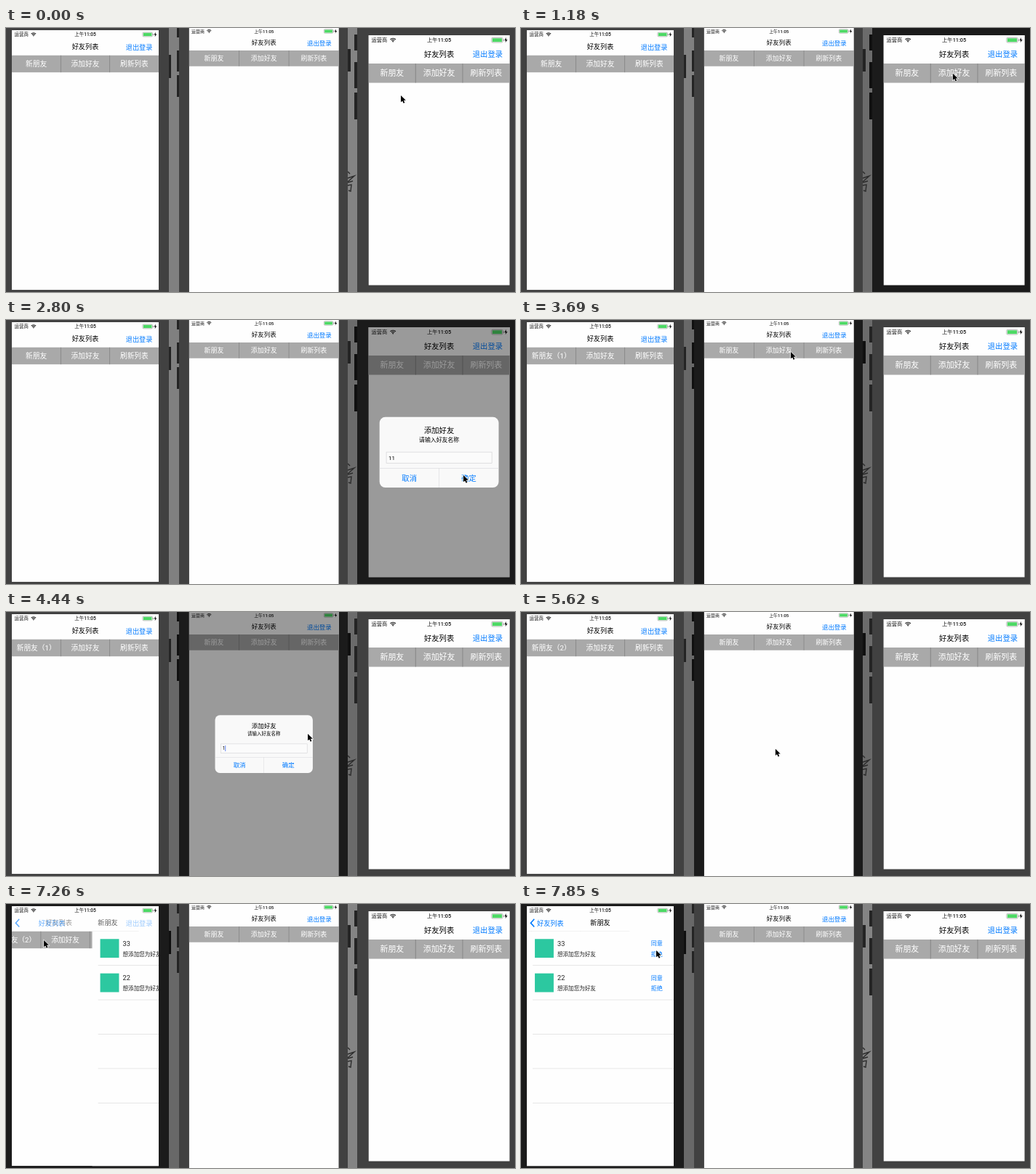
These frames come from a looping animation (700x364 px, 8000 ms). An HTML page with a canvas:

```html
<!DOCTYPE html>
<html lang="zh">
<head>
<meta charset="utf-8">
<style>
html, body { margin: 0; width: 100%; height: 100%; overflow: hidden; background: #808080; }
canvas { display: block; width: 700px; height: 364px; }
</style>
</head>
<body>
<canvas id="stage"></canvas>
<script>
const canvas = document.getElementById('stage');
const ctx = canvas.getContext('2d');
const ratio = window.devicePixelRatio || 1;
canvas.width = 700 * ratio;
canvas.height = 364 * ratio;

const LOOP = 8000, STEP = LOOP / 54;
const BLUE = '#007aff', PAPER = '#fefefe';
const PUSH = 7150;

// Screen origin, scale and size in points; body edges; side buttons as [x, y, height]
const phones = [
  { x: 8, y: 3, s: .5387, w: 375, h: 665, margin: 16, left: 0, right: 224,
    on: 6800, off: 9000, keys: [[222, 37, 32]] },
  { x: 251.7, y: -1, s: .4976, w: 414, h: 736, margin: 20, left: 238, right: 470,
    on: 3540, off: 6800, keys: [[235, 0, 13], [235, 31, 29], [235, 65, 30], [469, 29, 31]],
    alert: { open: 3715, close: 5290, typed: [4300, 4590] } },
  { x: 498.5, y: 10, s: .607, w: 320, h: 568, margin: 16, left: 483, right: 700,
    on: 1180, off: 3540, keys: [[479, 9, 22], [479, 47, 36], [479, 89, 37]],
    alert: { open: 1510, close: 2900, typed: [1960, 2210] } }
];

// Pointer stops: time, x, y
const stops = [
  [0, 543, 93], [140, 542, 93], [500, 542, 93], [1250, 595, 62], [1800, 595, 62],
  [2550, 629, 214], [2980, 629, 214], [3660, 371, 44], [3960, 371, 44],
  [4440, 415, 168], [4900, 388, 207], [5340, 388, 207], [6660, 79, 58],
  [6900, 52, 50], [7250, 52, 50], [7840, 186, 64], [8000, 186, 64]
];

const clamp = v => Math.max(0, Math.min(1, v));
const easeOut = v => 1 - (1 - clamp(v)) ** 3;
const smooth = v => v * v * (3 - 2 * v);

function rect(x, y, w, h, color) {
  ctx.fillStyle = color;
  ctx.fillRect(x, y, w, h);
}

function text(str, x, y, size, color, align = 'center', weight = 400) {
  ctx.font = `${weight} ${size}px Roboto, "Noto Sans CJK SC", "Noto Sans CJK", sans-serif`;
  ctx.textAlign = align;
  ctx.fillStyle = color;
  ctx.fillText(str, x, y + size * .37);
}

function line(color, width, ...points) {
  ctx.strokeStyle = color;
  ctx.lineWidth = width;
  ctx.beginPath();
  points.forEach(p => ctx.lineTo(...p));
  ctx.stroke();
}

function withAlpha(alpha, draw) {
  ctx.save();
  ctx.globalAlpha *= alpha;
  draw();
  ctx.restore();
}

function wallpaper(t) {
  const active = phones.map(p => t >= p.on && t < p.off);
  rect(224, 0, 14, 364, active[0] || active[1] ? '#686868' : '#808080');
  rect(470, 0, 13, 364, active[1] || active[2] ? '#6b6b6b' : '#848484');
  line('#2c2c2c', 1.4, [470, 207], [479, 204], [470, 212]);
  line('#2c2c2c', 1.4, [470, 198], [473, 201]);
  line('#2c2c2c', 1.4, [470, 213], [477, 211]);
  line('#2c2c2c', 1.4, [470, 217], [475, 216], [474, 225], [471, 224]);
}

function statusBar(w) {
  text('运营商', 6.5, 11, 12, '#111', 'left');
  text('上午11:05', w / 2, 11, 12, '#111', 'center', 500);
  ctx.strokeStyle = ctx.fillStyle = '#111';
  ctx.lineWidth = 2;
  for (const r of [8.5, 5.2]) {
    ctx.beginPath();
    ctx.arc(55.5, 15.5, r, -Math.PI * .75, -Math.PI * .25);
    ctx.stroke();
  }
  ctx.beginPath();
  ctx.arc(55.5, 15, 2.4, -Math.PI * .8, -Math.PI * .2);
  ctx.lineTo(55.5, 16);
  ctx.fill();
  ctx.strokeStyle = '#888';
  ctx.lineWidth = 1;
  ctx.beginPath();
  ctx.roundRect(w - 41, 5.5, 25, 11, 2.5);
  ctx.stroke();
  rect(w - 39.3, 7, 21.6, 8, '#4cd964');
  rect(w - 15, 9, 1.5, 4, '#888');
  ctx.fillStyle = '#111';
  ctx.fill(new Path2D(`M${w - 8} 5l-4 7h3l-1 5 5-7h-3z`));
}

function buttonBar(w, count) {
  rect(0, 64, w, 44, '#a9a9a9');
  const labels = ['新朋友' + (count ? `（${count}）` : ''), '添加好友', '刷新列表'];
  labels.forEach((label, i) => {
    text(label, w * (i + .5) / 3, 86, 18, '#fff');
    if (i) rect(w * i / 3 - .7, 64, 1.4, 44, '#808080');
  });
}

function requests(w, h) {
  rect(0, 64, w, h, PAPER);
  for (let i = 0; i < 5; i++) rect(15, 151 + i * 88, w, 1.3, '#dcdcdc');
  ['33', '22'].forEach((name, i) => {
    const y = 64 + i * 88;
    rect(20.5, y + 20, 48, 48, '#2cc8a0');
    text(name, 78, y + 31.5, 17, '#222', 'left');
    text('想添加您为好友', 78, y + 58, 14, '#222', 'left');
    text('同意', 332, y + 31, 15, BLUE);
    text('拒绝', 332, y + 58, 15, BLUE);
  });
}

function navBar(p, nav) {
  rect(0, 0, p.w, 64, PAPER);
  statusBar(p.w);
  withAlpha(1 - nav, () => {
    text('好友列表', p.w / 2 - nav * 110, 42.7, 17, '#000', 'center', 500);
    text('退出登录', p.w - p.margin, 43, 17, BLUE, 'right');
  });
  if (!nav) return;
  withAlpha(nav, () => {
    line(BLUE, 3, [19, 33], [10, 43], [19, 53]);
    text('好友列表', 26 + (1 - nav) * 110, 43, 17, BLUE, 'left');
    text('新朋友', p.w / 2 + (1 - nav) * 150, 42.7, 17, '#000', 'center', 500);
  });
}

function alertContent(t, { open, typed }) {
  const keysDown = typed.filter(k => t >= k);
  const value = '1'.repeat(keysDown.length);
  text('添加好友', 135, 30, 17, '#000', 'center', 500);
  text('请输入好友名称', 135, 51.5, 13, '#000');
  rect(15, 79, 240, 26, '#cdcdd0');
  rect(16, 80, 238, 24, '#fbfbfb');
  text(value, 20.5, 92, 13, '#000', 'left');
  const caretX = 20.5 + ctx.measureText(value).width;
  if ((t - Math.max(open, ...keysDown)) % 1000 < 500) rect(caretX, 84, 1.6, 16, '#426bf2');
  rect(0, 116, 270, 1, '#d9d9dc');
  rect(134.5, 116, 1, 44, '#d9d9dc');
  text('取消', 67.5, 138.5, 17, BLUE);
  text('确定', 202.5, 138.5, 17, BLUE);
}

function alertBox(p, t) {
  const { open, close } = p.alert;
  const shown = easeOut((t - open) / 400);
  const kept = 1 - clamp((t - close) / 250);
  if (t < open || !kept) return;

  withAlpha(shown * kept, () => rect(0, 0, p.w, p.h, 'rgba(0,0,0,.395)'));
  withAlpha(kept, () => {
    ctx.translate(p.w / 2, p.h / 2);
    ctx.scale(1.2 - .2 * shown, 1.2 - .2 * shown);
    ctx.translate(-135, -80);
    withAlpha(Math.sqrt(shown), () => {
      ctx.fillStyle = '#f9f9f9';
      ctx.beginPath();
      ctx.roundRect(0, 0, 270, 160, 13);
      ctx.fill();
    });
    withAlpha(shown, () => alertContent(t, p.alert));
  });
}

function phone(p, i, t) {
  const active = t >= p.on && t < p.off;
  p.keys.forEach(([x, y, h]) => rect(x, y, 5, h, active ? '#101010' : '#242424'));
  rect(p.left, 0, p.right - p.left, 364, active ? '#1b1b1b' : '#414141');

  ctx.save();
  ctx.translate(p.x, p.y);
  ctx.scale(p.s, p.s);
  ctx.beginPath();
  ctx.rect(0, 0, p.w, p.h);
  ctx.clip();
  rect(0, 0, p.w, p.h, PAPER);

  const push = i ? 0 : easeOut((t - PUSH) / 600);
  const count = i ? 0 : (t >= 3100) + (t >= 5620);
  ctx.save();
  ctx.translate(-p.w * .3 * push, 0);
  buttonBar(p.w, count);
  ctx.restore();
  if (push) {
    ctx.save();
    ctx.translate(p.w * (1 - push), 0);
    requests(p.w, p.h);
    ctx.restore();
  }
  navBar(p, i ? 0 : easeOut((t - PUSH) / 400));
  if (p.alert) alertBox(p, t);
  ctx.restore();
}

function pointer(t) {
  const i = stops.findIndex(s => s[0] > t);
  const [t0, x0, y0] = stops[i - 1], [t1, x1, y1] = stops[i];
  const k = smooth((t - t0) / (t1 - t0));
  ctx.save();
  ctx.translate(x0 + (x1 - x0) * k, y0 + (y1 - y0) * k);
  ctx.scale(.9, .9);
  const arrow = new Path2D('M0 0V10.4L2.4 8.2 4.1 12 6 11.2 4.3 7.5H7.6Z');
  ctx.strokeStyle = '#fff';
  ctx.lineWidth = 1.4;
  ctx.stroke(arrow);
  ctx.fillStyle = '#000';
  ctx.fill(arrow);
  ctx.restore();
}

function frame(now) {
  const t = Math.min(53, Math.floor((now % LOOP + 20) / STEP)) * STEP;
  ctx.setTransform(ratio, 0, 0, ratio, 0, 0);
  wallpaper(t);
  for (const i of [2, 1, 0]) phone(phones[i], i, t);
  pointer(t);
}

let start;
function tick(now) {
  start ??= now;
  frame(now - start);
  requestAnimationFrame(tick);
}
frame(0);
requestAnimationFrame(tick);
</script>
</body>
</html>
```
